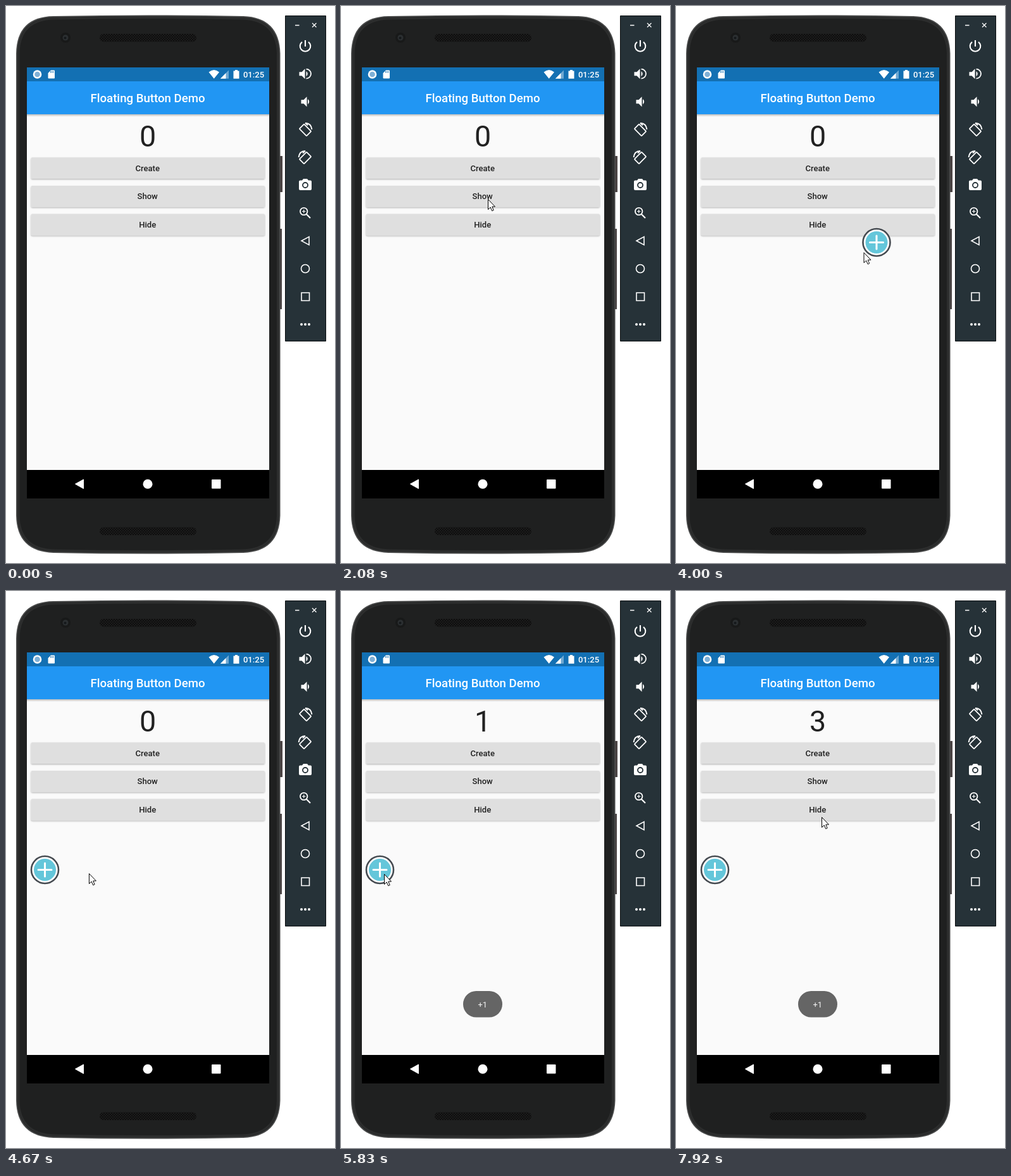
Recreate the animation shown at these times as an HTML page. Size 520 by 880 pixels, loop 8000 ms.

```html
<!DOCTYPE html>
<html lang="en">
<head>
<meta charset="utf-8">
<title>Floating button</title>
<style>
  html, body { margin: 0; width: 100%; height: 100%; overflow: hidden; background: #fff; }
  svg { display: block; width: 520px; height: 880px; }
  text { font-family: Roboto, Arial, sans-serif; font-weight: 500; font-size: 13.05px; text-anchor: middle; fill: #212121; }
  .line { fill: none; stroke: #fff; stroke-width: 1.8; }
  .white { fill: #fff; }
</style>
</head>
<body>
<svg viewBox="0 0 520 880">
  <defs>
    <pattern id="mesh" width="4" height="4" patternUnits="userSpaceOnUse">
      <rect width="4" height="4" fill="#0e0e0e"/>
      <circle cx="1" cy="1" r=".8" fill="#2d2d2d"/>
      <circle cx="3" cy="3" r=".8" fill="#2d2d2d"/>
    </pattern>
    <linearGradient id="shade" x2="0" y2="1">
      <stop stop-color="#000" stop-opacity=".25"/>
      <stop offset="1" stop-color="#000" stop-opacity="0"/>
    </linearGradient>
    <filter id="soft" x="-5%" y="-20%" width="110%" height="150%">
      <feDropShadow dx="0" dy="1.3" stdDeviation="1" flood-opacity=".3"/>
    </filter>
    <g id="turn">
      <rect x="-8" y="-5.2" width="16" height="10.4" rx="1" transform="translate(0 1) rotate(45)" class="line"/>
      <path d="M0-10Q9-10 10.5 0M0-10L4-6.5" class="line" stroke-width="1.5"/>
    </g>
  </defs>

  <!-- phone -->
  <path d="M432 237h5v57h-5zM432 352h4v127h-4z" fill="#4b4444"/>
  <path d="M17 75Q18 18 75 17Q225 14 375 17Q431 19 432.500 75V805Q431 861 375 863Q225 866 75 863Q18 861 17 805Z" fill="#1f2020" stroke="#464747" stroke-width="2"/>
  <path d="M20 75Q21 21 76 20Q225 17 374 20Q428 22 429.500 75V805Q428 858 374 860Q225 863 76 860Q21 858 20 805Z" fill="none" stroke="#2c2d2d" stroke-width="3"/>
  <circle cx="94" cy="50" r="8" fill="#181919"/>
  <circle cx="94" cy="50" r="4.500" fill="#2b2f31"/>
  <circle cx="93.500" cy="50.500" r="2" fill="#14181a"/>
  <rect x="148" y="44" width="153" height="12.500" rx="6" fill="url(#mesh)"/>
  <rect x="148" y="823.500" width="153" height="12.500" rx="6" fill="url(#mesh)"/>

  <!-- screen -->
  <path d="M33 97h383v681H33z" fill="#fafafa"/>
  <path d="M33 171h383v4H33z" fill="url(#shade)"/>
  <path d="M33 119h383v52H33z" fill="#2196f3"/>
  <path d="M33 97h383v22H33z" fill="#1370b3"/>
  <circle cx="49.500" cy="108" r="6.800" class="white"/>
  <circle cx="49.500" cy="108" r="4.300" fill="#7fb0d6"/>
  <path d="M71 101.500h5q1 0 1 1v11q0 1-1 1h-8.500q-1 0-1-1v-7.500z" class="white"/>
  <path d="M70.500 103v2.500M72.700 103v2.500M74.900 103v2.500" stroke="#1370b3"/>
  <path d="M320.500 104.500Q328.700 97.500 337 104.500L328.700 114.700z" class="white"/>
  <path d="M352 101.500V114.700H338.800z" fill="#6fa8d2"/>
  <path d="M347.500 106V114.700H338.800z" class="white"/>
  <path d="M359.500 102.500h2.500v-1.500h4v1.500h2.500v12.300h-9z" class="white"/>
  <text x="391.500" y="112.700" style="fill:#fff">01:25</text>
  <text x="224" y="152.300" style="fill:#fff;font-size:18.64px">Floating Button Demo</text>
  <text id="count" x="224" y="222" style="font-size:46.6px;font-weight:400">0</text>
  <g id="buttons"></g>
  <g id="toast">
    <rect x="193" y="632" width="62" height="41.500" rx="20.700" fill="#656565"/>
    <text x="223.800" y="658" style="fill:#f2f2f2;font-weight:400">+1</text>
  </g>
  <g id="float">
    <circle r="21.500" fill="#fff" stroke="#454a50" stroke-width="2.600"/>
    <circle r="17.500" fill="#64c6da"/>
    <path d="M-10.500 0h21M0-10.500v21" stroke="#fff" stroke-width="3" stroke-linecap="round"/>
  </g>
  <path d="M33 733h383v45H33z"/>
  <path d="M109.500 755.200L122.500 748V762.500z" class="white" stroke="#fff" stroke-linejoin="round"/>
  <circle cx="224" cy="755.200" r="7.500" class="white"/>
  <rect x="325" y="748" width="14.500" height="14.500" rx="1" class="white"/>

  <!-- toolbar -->
  <path d="M441.500 15.500h64v514h-64z" fill="#263238" stroke="#0b0f11"/>
  <path d="M457 30.500h6.500M484 27l6.500 6.500M490.500 27l-6.500 6.500" class="line" style="stroke-width:1.3"/>
  <path d="M473 54v10M468 56.800a8.300 8.300 0 1 0 10 0" class="line" style="stroke-width:2.1"/>
  <path d="M463.500 104.300h4l5-5v16l-5-5h-4z" class="white"/>
  <path d="M474.500 103q4.500 4 0 8.500z" class="white"/>
  <path d="M474.500 99.600a7.500 7.500 0 0 1 0 15" class="line"/>
  <path d="M466.500 148.300h4l5-5v16l-5-5h-4z" class="white"/>
  <path d="M477 147q4.500 4 0 8.500z" class="white"/>
  <use href="#turn" x="473" y="195"/>
  <use href="#turn" transform="translate(473 239) scale(-1 1)"/>
  <path d="M470 273h6l2 2.500h3q2 0 2 2v11.500q0 2-2 2h-16q-2 0-2-2v-11.500q0-2 2-2h3z" class="white"/>
  <circle cx="473" cy="283" r="4" fill="#fff" stroke="#263238" stroke-width="1.800"/>
  <circle cx="470.700" cy="324.500" r="5.700" class="line"/>
  <path d="M475 329l6 6" class="line" style="stroke-width:2.2"/>
  <path d="M468 324.500h5.400M470.700 321.800v5.400" class="line" style="stroke-width:1.2"/>
  <path d="M467 371L479 364.500V377.500z" class="line" style="stroke-width:1.6"/>
  <circle cx="473" cy="415" r="6.500" class="line" style="stroke-width:1.6"/>
  <path d="M467 453h12.500v12.500h-12.500z" class="line" style="stroke-width:1.6"/>
  <path d="M467 503h.01M473 503h.01M479 503h.01" class="line" style="stroke-width:4;stroke-linecap:round"/>

  <path id="cursor" d="M.5.5V16.500L4.200 13L6.700 18.700L9.200 17.600L6.800 12H11.500z" fill="#fff" stroke="#000"/>
</svg>
<script>
const $ = id => document.getElementById(id);
const LOOP = 8000, STEP = 1000 / 12;

$('buttons').innerHTML = ['Create', 'Show', 'Hide'].map((label, i) => {
  const y = 239.2 + i * 44.7;
  const box = `x="39.5" y="${y}" width="369.500" height="33.600" rx="2"`;
  return `<clipPath id="clip${i}"><rect ${box}/></clipPath>
    <rect ${box} fill="#dfdfdf" filter="url(#soft)"/>
    <g clip-path="url(#clip${i})"><circle id="ripple${i}" cx="232" cy="${y + 22}"/></g>
    <text x="223.700" y="${y + 21.4}">${label}</text>`;
}).join('');

// Each key: time, x, y
const cursorPath = [
  [333, 290, 400], [1000, 232, 262], [1500, 232, 262], [1917, 232, 305],
  [2800, 232, 305], [3333, 318, 328], [3583, 361, 339], [3667, 361, 340],
  [4000, 297, 389], [4333, 131, 446], [4667, 131, 446], [5167, 68, 447],
  [7000, 68, 447], [7750, 230, 357]
];
const floatPath = [
  [2833, 367.5, 338.5], [3700, 367.5, 338.5], [4000, 317.5, 373.3],
  [4333, 146, 440.5], [4417, 94, 440.5], [4583, 61.5, 440.5]
];
const presses = [5417, 6250, 6750];

const clamp = v => Math.max(0, Math.min(1, v));
const ramp = (t, from, to) => clamp((t - from) / (to - from));

function place(id, path, t) {
  const el = $(id);
  el.style.display = t < path[0][0] ? 'none' : '';
  const i = Math.max(0, path.findLastIndex(k => k[0] <= t));
  const a = path[i], b = path[i + 1] || a;
  const p = a === b ? 0 : ramp(t, a[0], b[0]);
  const mix = n => a[n] + (b[n] - a[n]) * p;
  el.setAttribute('transform', `translate(${mix(1)} ${mix(2)})`);
}

function ripple(i, t, start) {
  const el = $('ripple' + i);
  el.setAttribute('r', 230 * ramp(t, start, start + 400));
  el.setAttribute('opacity', 0.12 * (1 - ramp(t, start + 250, start + 550)));
}

function draw(now) {
  const t = Math.floor((now % LOOP + 4) / STEP) * STEP + 1;
  place('cursor', cursorPath, t);
  place('float', floatPath, t);
  ripple(0, t, 1083);
  ripple(1, t, 2167);
  $('count').textContent = presses.filter(p => t >= p).length;
  const first = ramp(t, 5417, 5667) - ramp(t, 7083, 7333);
  $('toast').setAttribute('opacity', clamp(first + ramp(t, 7417, 7667)));
}

const start = performance.now();
(function tick() {
  draw(performance.now() - start);
  requestAnimationFrame(tick);
})();
</script>
</body>
</html>
```
